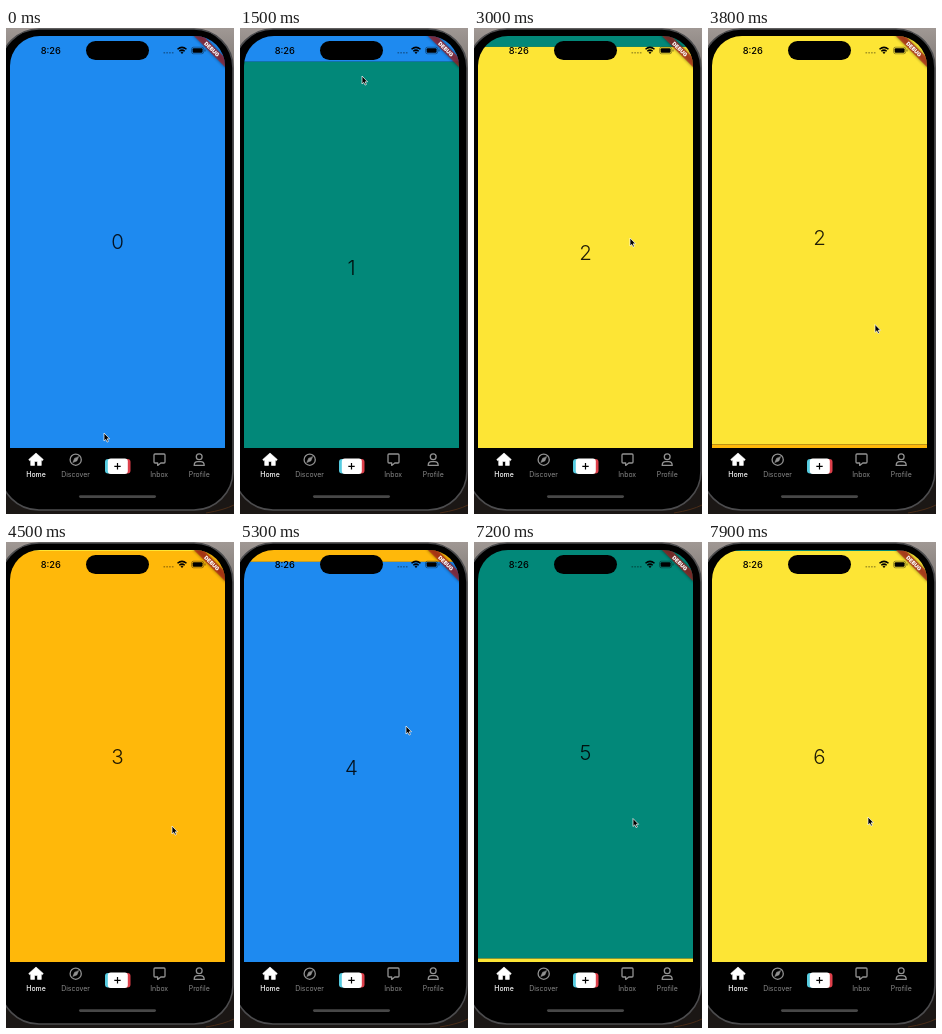
These frames come from a looping animation (228x486 px, 8000 ms). An HTML page:

```html
<!DOCTYPE html>
<html lang="en">
<head>
<meta charset="utf-8">
<title>Swipe feed</title>
<style>
html, body { margin: 0; width: 100%; height: 100%; overflow: hidden; background: #111; }
svg { display: block; width: 228px; height: 486px; font-family: Inter, Roboto, sans-serif; text-anchor: middle; }
.num { font-size: 20.5px; font-weight: 350; fill-opacity: .87; }
.nav { font-size: 6.9px; fill: #8b8b8b; }
.nav text:first-child { fill: #fff; font-weight: 500; }
.icon { fill: none; stroke: #929292; stroke-width: 1.3; stroke-linejoin: round; stroke-linecap: round; }
</style>
</head>
<body>
<svg viewBox="0 0 228 486">
  <defs>
    <linearGradient id="desk" x1="0" y1="0" x2="0" y2="1">
      <stop offset="0" stop-color="#a09894"/>
      <stop offset=".15" stop-color="#66625f"/>
      <stop offset=".5" stop-color="#3a3836"/>
      <stop offset=".8" stop-color="#1b1715"/>
    </linearGradient>
    <clipPath id="screen"><path d="M4 420V38a30 30 0 0 1 30-30H189a30 30 0 0 1 30 30V420z"/></clipPath>
    <filter id="soft" x="-20%" y="-100%" width="140%" height="300%"><feGaussianBlur stdDeviation="1.4"/></filter>
  </defs>

  <rect width="228" height="486" fill="url(#desk)"/>
  <path d="M200 485Q218 482 228 477" stroke="#4a2c17" fill="none"/>
  <rect x="-6" y="1" width="233" height="481" rx="39" stroke="#4c4c4e" stroke-width="1.6"/>

  <g clip-path="url(#screen)">
    <g id="pages"></g>
    <g transform="translate(219 8) rotate(45)">
      <rect x="-24" y="15.3" width="48" height="6.6" opacity=".5" filter="url(#soft)"/>
      <rect x="-24" y="15.3" width="48" height="6.6" fill="#b71c1c" fill-opacity=".63"/>
      <text y="20.6" font-size="5.4" font-weight="900" fill="#fff">DEBUG</text>
    </g>
  </g>

  <text x="44.8" y="25.9" font-size="9.3" font-weight="550">8:26</text>
  <rect x="80" y="13" width="63" height="19" rx="9.5"/>
  <path d="M157.5 24.7h10" stroke="#000" stroke-opacity=".35" stroke-width="1.5" stroke-dasharray="1.6 1.2"/>
  <g fill="none" stroke="#000" stroke-width="1.5">
    <path d="M171.5 21.3Q176 17.4 180.5 21.3M173.3 23.3Q176 21 178.7 23.3"/>
    <path d="M175 24.2h2L176 25.6z" stroke-width=".8" fill="#000"/>
    <rect x="185.5" y="19.2" width="12.2" height="6.6" rx="2" stroke-width=".7" stroke-opacity=".5"/>
    <path d="M199 21.5v2" stroke-width="1" stroke-opacity=".5"/>
  </g>
  <rect x="186.6" y="20.2" width="10" height="4.6" rx="1.1"/>

  <path d="M30 425l7.3 6.6-1.1 1.2-.9-.7v5.3h-3.8v-4h-3v4h-3.8v-5.3l-.9.7-1.1-1.2z" fill="#fff" stroke="#fff" stroke-width=".6" stroke-linejoin="round"/>
  <g class="icon">
    <circle cx="69.7" cy="431.7" r="5.6"/>
    <path d="M72.6 428.8l-1.7 4.1-4.1 1.7 1.7-4.1z" fill="#929292" stroke-width=".5"/>
    <path d="M149 426h9q1 0 1 1v7q0 1-1 1h-3.2l-3.1 2.4V435H149q-1 0-1-1v-7q0-1 1-1z"/>
    <circle cx="193.2" cy="428.8" r="2.9"/>
    <path d="M188.2 437.4q0-3.7 3.5-3.7h3q3.5 0 3.5 3.7z"/>
  </g>
  <rect x="99" y="431" width="14" height="14.5" rx="3" fill="#55cbe0"/>
  <rect x="111" y="431" width="13.5" height="14.5" rx="3" fill="#dd3f4a"/>
  <rect x="101.8" y="430.5" width="20" height="15.5" rx="3" fill="#fff"/>
  <path d="M108.3 438.3h6.4M111.5 435.1v6.4" stroke="#000" stroke-width="1.2"/>
  <g class="nav">
    <text x="30" y="449.3">Home</text>
    <text x="69.5" y="449.3">Discover</text>
    <text x="153.2" y="449.3">Inbox</text>
    <text x="193.2" y="449.3">Profile</text>
  </g>
  <rect x="73" y="467.2" width="77" height="2.8" rx="1.4" fill="#474747"/>
  <path id="cursor" d="M0 0v8l1.8-1.6 1.2 2.7 1.4-.6-1.2-2.7h2.4z" stroke="#fff" stroke-width=".7"/>
</svg>
<script>
const LOOP = 8000, TOP = 8, PAGE = 412;
const SETTLE = 0.00908;          // decay of the page spring, per ms
const HOLD = 360, RETURN = 260;  // pointer pause and way back after a swipe, ms
const colors = ['#1e8af0', '#028879', '#fde535', '#ffb80a'];

const swipe = (release, x, from, to) => {
  const drag = from - to;
  // Drag time that makes the pointer as fast as the spring at release
  return { release, x, from, to, drag, time: 2 * drag / ((PAGE - drag) * SETTLE) };
};
const swipes = [
  swipe(1310, 122, 314, 48), swipe(2639, 156, 330, 210), swipe(3876, 167, 300, 180),
  swipe(4941, 166, 284, 184), swipe(6218, 155, 273, 123), swipe(7276, 159, 280, 160),
  swipe(8600, 160, 275, 155)
];

const pages = document.getElementById('pages');
const cursor = document.getElementById('cursor');
pages.innerHTML = swipes.map((_, i) => {
  const y = TOP + i * PAGE;
  return `<rect x="4" y="${y}" width="215" height="${PAGE}" fill="${colors[i % 4]}"/>
    <text class="num" x="111.5" y="${y + 213}">${i}</text>`;
}).join('');

const clamp = u => Math.max(0, Math.min(1, u));
const smooth = u => u * u * (3 - 2 * u);

function draw(t) {
  let scroll = 0, x = 98, y = 405, freeAt = 0;
  for (const s of swipes) {
    if (t < freeAt) break;
    const back = smooth(clamp((t - freeAt) / RETURN));
    const pulled = s.drag * clamp((t - s.release + s.time) / s.time) ** 2;
    x += (s.x - x) * back;
    y += (s.from - y) * back - pulled;
    scroll += t < s.release ? pulled
      : PAGE - (PAGE - s.drag) * Math.exp(-SETTLE * (t - s.release));
    freeAt = s.release + HOLD;
  }
  pages.setAttribute('transform', `translate(0 ${-scroll})`);
  cursor.setAttribute('transform', `translate(${x} ${y})`);
}

const start = performance.now();
function tick() {
  draw((performance.now() - start) % LOOP);
  requestAnimationFrame(tick);
}
tick();
</script>
</body>
</html>
```
